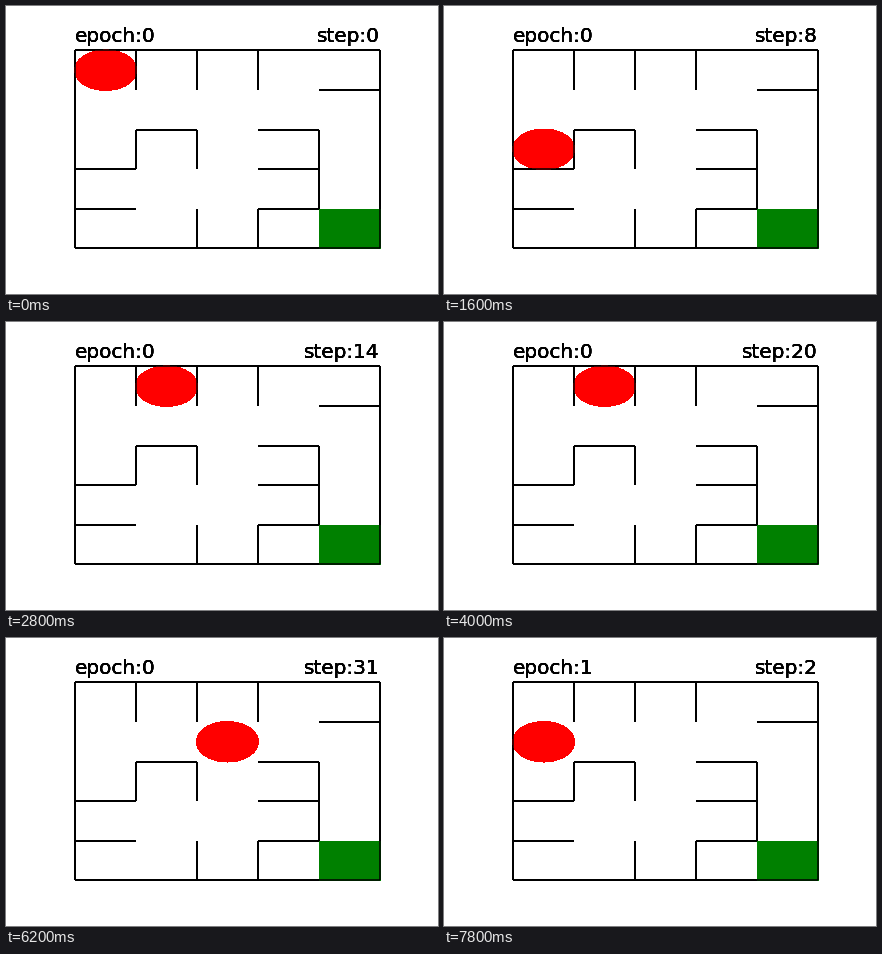
A matplotlib script for the animation above (8 s loop, 432 by 288 pixels).

```python
import matplotlib.pyplot as plt
from matplotlib.animation import FuncAnimation
from matplotlib.patches import Circle, Rectangle

plt.rcParams["font.family"] = "DejaVu Sans"

SIZE = 5
FRAMES, INTERVAL = 40, 200
EPOCH_LEN = 37  # steps 0 to 36
LABEL_Y = 5.22

# Walls as corner points in cell units, y upwards
BORDER = [(0, 0), (SIZE, 0), (SIZE, SIZE), (0, SIZE), (0, 0)]
TEETH = [[(x, 4), (x, 5)] for x in (1, 2, 3)]
BARS = [[(x, y), (x + 1, y)] for x, y in ((4, 4), (3, 2), (0, 1))]
HOOKS = [
    [(0, 2), (1, 2), (1, 3), (2, 3), (2, 2)],
    [(3, 3), (4, 3), (4, 1), (3, 1), (3, 0)],
    [(2, 0), (2, 1)],
]

# Runs of moves by first step; between runs the agent is held by a wall
MOVES = {"U": (0, 1), "D": (0, -1), "L": (-1, 0), "R": (1, 0)}
RUNS = {2: "DD", 9: "URU", 28: "DLRRLLD"}


def cell_at(step):
    """Lower left corner of the agent's cell after a number of steps."""
    x, y = 0, SIZE - 1
    for first, run in RUNS.items():
        for move in run[:max(0, step - first + 1)]:
            dx, dy = MOVES[move]
            x, y = x + dx, y + dy
    return x, y


def draw_walls(lw, zorder):
    for points in [BORDER, *TEETH, *BARS, *HOOKS]:
        for (x0, y0), (x1, y1) in zip(points, points[1:]):
            ax.plot([x0, x1], [y0, y1], color="black", lw=lw, zorder=zorder,
                    solid_capstyle="butt")


def label(x, align):
    """Stacked copies of one text, which give it firm, heavy edges."""
    return [ax.text(x, LABEL_Y, "", fontsize=20, ha=align) for _ in range(5)]


fig = plt.figure(figsize=(6, 4), dpi=72, facecolor="white")
ax = fig.add_axes([0.125, 0.125, 0.775, 0.755])
ax.set_xlim(-0.25, SIZE + 0.25)
ax.set_ylim(-0.25, SIZE + 0.25)
ax.axis("off")

# Solid lines below the shapes, thinner ones above let their colour through
draw_walls(lw=2, zorder=0)
draw_walls(lw=1.5, zorder=2)

shape = dict(lw=1, antialiased=False, zorder=1)
ax.add_patch(Rectangle((4, 0), 1, 1, color="green", **shape))
agent = ax.add_patch(Circle((0.5, 4.5), 0.5, color="red", **shape))
epoch_label = label(0, "left")
step_label = label(SIZE, "right")


def update(frame):
    epoch, step = divmod(frame, EPOCH_LEN)
    x, y = cell_at(step)
    agent.center = (x + 0.5, y + 0.5)
    for text in epoch_label:
        text.set_text(f"epoch:{epoch}")
    for text in step_label:
        text.set_text(f"step:{step}")
    return [agent, *epoch_label, *step_label]


anim = FuncAnimation(fig, update, frames=FRAMES, interval=INTERVAL,
                     init_func=lambda: update(0), repeat=True,
                     repeat_delay=0, blit=False)
plt.show()
```
